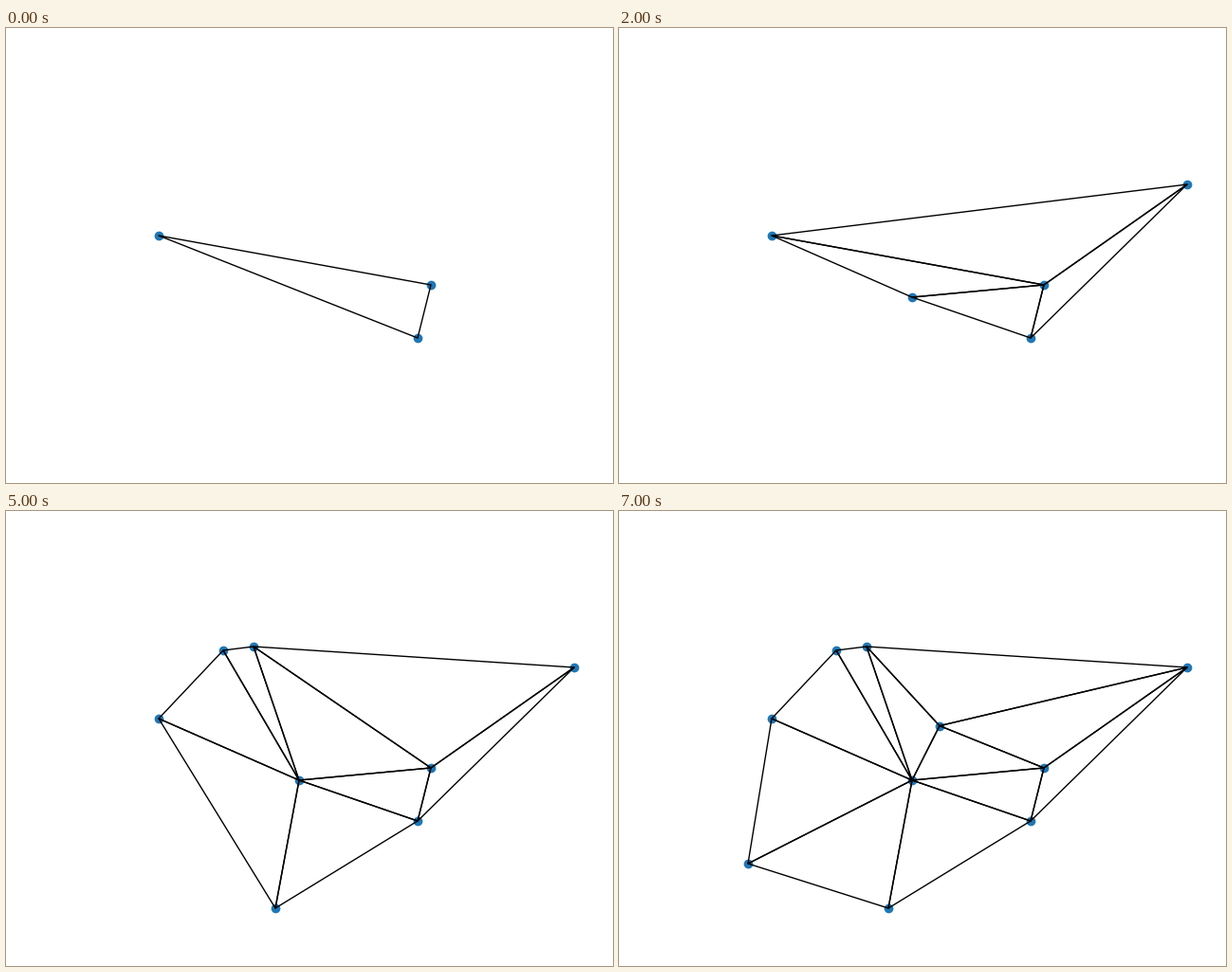
Recreate the animation shown at these times as a matplotlib script. Size 640 px wide and 480 px high, loop 8 s.

```python
import matplotlib.pyplot as plt
import numpy as np
from matplotlib.animation import FuncAnimation
from matplotlib.collections import PolyCollection
from matplotlib.tri import Triangulation

W, H, DPI = 640, 480, 100
START = 3  # points in the first triangle

# Key points in the order they join the mesh, in pixels from the top left;
# all edges follow from their Delaunay triangulation
POINTS = np.array([
    (161, 219), (448, 271), (434, 327), (599, 165), (309, 284),
    (229, 147), (284, 419), (261, 143), (136, 372), (338, 226.6),
])

fig = plt.figure(figsize=(W / DPI, H / DPI), dpi=DPI, facecolor="white")
ax = fig.add_axes([0, 0, 1, 1])
ax.set_xlim(0, W)
ax.set_ylim(H, 0)
ax.axis("off")

dots = ax.scatter([], [], s=36, color="#1f77b4", zorder=1)
# Each triangle is outlined on its own, so shared edges come out darker
mesh = PolyCollection([], facecolors="none", edgecolors="black",
                      linewidths=1, zorder=2)
ax.add_collection(mesh, autolim=False)


def update(step):
    pts = POINTS[:START + step]
    tri = Triangulation(*pts.T)
    dots.set_offsets(pts)
    mesh.set_verts(pts[tri.triangles])
    return dots, mesh


anim = FuncAnimation(fig, update, frames=len(POINTS) - START + 1,
                     interval=1000, repeat=True, repeat_delay=0)
plt.show()
```
